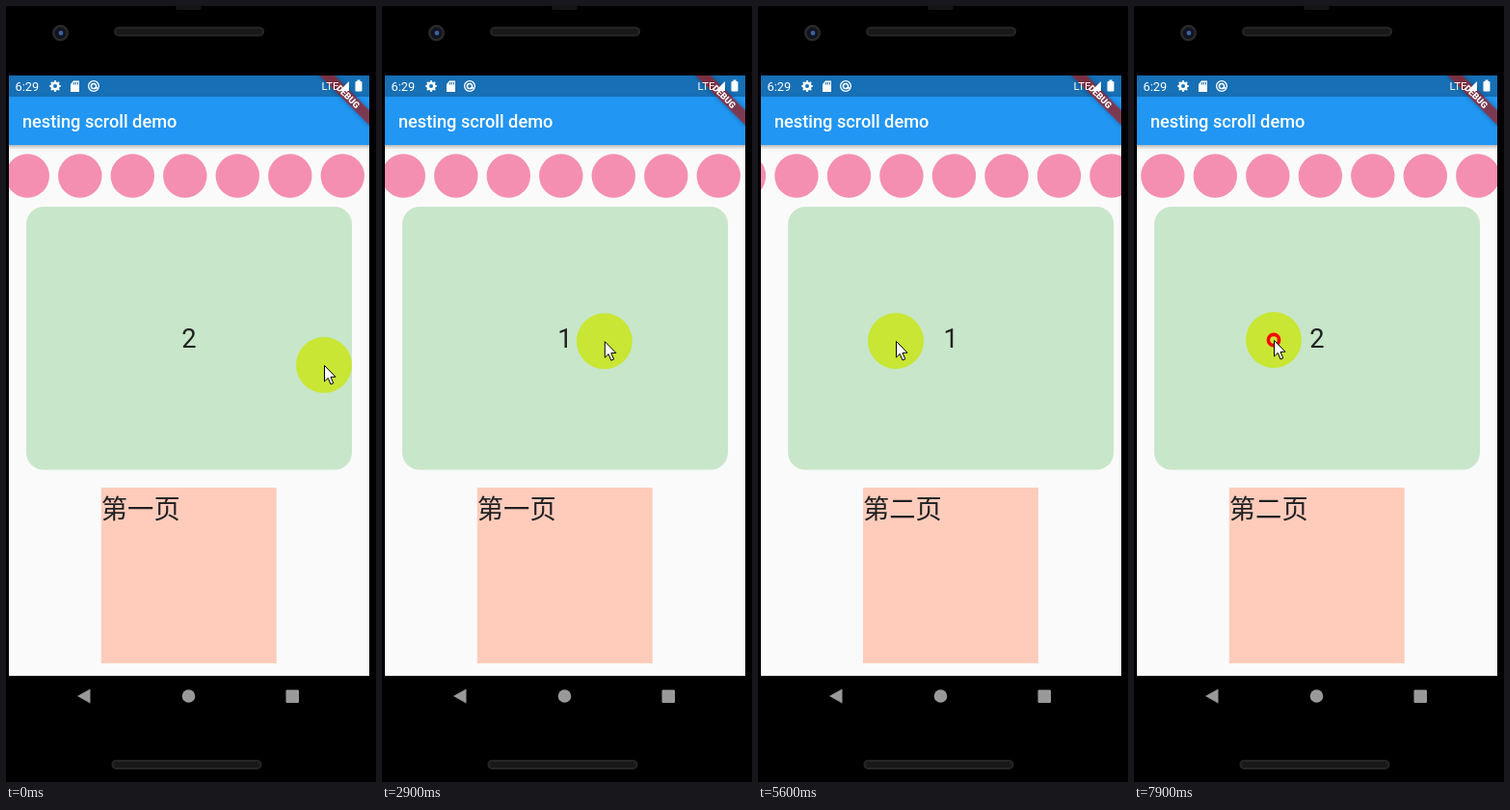
Recreate the animation shown at these times as an HTML page with a canvas. Size 384 by 804 pixels, loop 8 s.

```html
<!DOCTYPE html>
<html lang="zh-CN">
<head>
<meta charset="utf-8">
<style>
  html, body { margin: 0; height: 100%; overflow: hidden; background: #000; }
  canvas { display: block; }
</style>
</head>
<body>
<canvas id="stage" width="384" height="804"></canvas>
<script>
const ctx = document.getElementById('stage').getContext('2d');
const LOOP = 8000, STEP = 100, SETTLE = 505;
const LEFT = 3, WIDTH = 374, TOP = 144, BOTTOM = 694;
const FONT = 'Roboto, "Noto Sans CJK SC", "Noto Sans CJK", sans-serif';

// Each drag moves a pager with the cursor, then lets it settle from page `start` to page `end`.
const pointerStart = { time: -600, point: [330, 372] };
const drags = [
  { pager: 'upper', press: 1450, release: 2200, from: [205, 350], to: [356, 357], start: 1, end: 0 },
  { pager: 'upper', press: 3000, release: 3550, from: [215, 346], to: [337, 344], start: 0, end: 0 },
  { pager: 'upper', press: 3900, release: 4470, from: [337, 344], to: [165, 350], start: 0, end: 1 },
  { pager: 'outer', press: 4900, release: 5200, from: [282, 349], to: [143, 347], start: 0, end: 1 },
  { pager: 'lower', press: 6400, release: 6850, from: [230, 348], to: [110, 350], start: 0, end: 1 },
  { press: 7850, release: 8000, from: [145, 346], to: [145, 346] }
];

const clamp = u => Math.min(1, Math.max(0, u));
const smooth = u => u * u * (3 - 2 * u);
const easeOut = u => 1 - (1 - u) ** 2;
const mix = (a, b, u) => a + (b - a) * u;
const mixPoint = (a, b, u) => a.map((v, i) => mix(v, b[i], u));

// Between drags the pointer rests a while, then glides to the next press.
function pointer(t) {
  let last = pointerStart;
  for (const { press, release, from, to } of drags) {
    if (t < press) {
      const u = (t - last.time) / (press - last.time);
      return mixPoint(last.point, from, smooth(clamp((u - .4) / .6)));
    }
    if (t <= release) return mixPoint(from, to, (t - press) / (release - press));
    last = { time: release, point: to };
  }
  return last.point;
}

// A negative result is a pull beyond the first page.
function pagerPosition(pager, t) {
  const own = drags.filter(d => d.pager === pager);
  const drag = own.filter(d => t >= d.press).pop();
  if (!drag) return own[0].start;
  const { release, from, start, end } = drag;
  const held = start + (from[0] - pointer(Math.min(t, release))[0]) / WIDTH;
  return mix(held, end, easeOut(clamp((t - release) / SETTLE)));
}

function rect(x, y, w, h, color, radius = 0) {
  ctx.fillStyle = color;
  ctx.beginPath();
  ctx.roundRect(x, y, w, h, radius);
  ctx.fill();
}

function disc(x, y, r, color) {
  ctx.fillStyle = color;
  ctx.beginPath();
  ctx.arc(x, y, r, 0, Math.PI * 2);
  ctx.fill();
}

function ring(x, y, r, width, color) {
  ctx.strokeStyle = color;
  ctx.lineWidth = width;
  ctx.beginPath();
  ctx.arc(x, y, r, 0, Math.PI * 2);
  ctx.stroke();
}

function polygon(points, color) {
  ctx.fillStyle = color;
  ctx.beginPath();
  points.forEach(([x, y]) => ctx.lineTo(x, y));
  ctx.closePath();
  ctx.fill();
}

function text(str, x, y, size, color, weight = 400, align = 'left') {
  ctx.font = `${weight} ${size}px ${FONT}`;
  ctx.textAlign = align;
  ctx.fillStyle = color;
  ctx.fillText(str, x, y);
}

function clipped(x, y, w, h, draw) {
  ctx.save();
  ctx.beginPath();
  ctx.rect(x, y, w, h);
  ctx.clip();
  draw();
  ctx.restore();
}

function speaker(x, y) {
  rect(x, y, 156, 10, '#262626', 5);
  rect(x + 2, y + 2, 152, 6, '#181818', 3);
}

function drawPhone() {
  rect(0, 0, 384, 804, '#000');
  rect(176, 0, 27, 4, '#151515', 2);
  disc(56.5, 28, 8.5, '#2b2828');
  disc(56.5, 28, 6, '#111420');
  disc(57, 28, 2.4, '#3f5f9c');
  speaker(112, 21.5);
  speaker(109.5, 781);
  polygon([[74, 715], [87.5, 707.5], [87.5, 722.5]], '#999');
  disc(189.5, 715, 6.8, '#999');
  rect(290.5, 708.5, 13.5, 13.5, '#999', 1);
}

function drawPage(index, position, outerPosition) {
  const x = LEFT + WIDTH * (index - outerPosition);
  clipped(x, 208, WIDTH, 273, () => {
    for (let n = 0; n < 2; n++) {
      const cardX = x + WIDTH * (n - position);
      rect(cardX + 18, 208, 338, 272.5, '#c8e6c9', 18);
      text(n + 1, cardX + WIDTH / 2, 354, 27.3, '#212121', 400, 'center');
    }
  });
  rect(x + 95.8, 499, 182, 182, '#ffccbc');
  text(index ? '第二页' : '第一页', x + 95.8, 530.5, 27.3, '#212121');
}

// Overscroll glow: a parabolic edge bulging from the left side.
function drawGlow(top, bottom, centre, reach, bend, alpha) {
  ctx.fillStyle = `rgba(33,150,243,${alpha})`;
  ctx.beginPath();
  ctx.moveTo(LEFT, top);
  for (let y = top; y <= bottom; y += 2) {
    ctx.lineTo(LEFT + Math.max(0, reach - bend * (y - centre) ** 2), y);
  }
  ctx.lineTo(LEFT, bottom);
  ctx.fill();
}

function drawContent(t) {
  const outer = pagerPosition('outer', t), upper = pagerPosition('upper', t);
  const glow = clamp(-4 * upper);
  rect(LEFT, TOP, WIDTH, BOTTOM - TOP, '#fafafa');
  for (let n = 0; n < 15; n++) disc(22.3 + 54.5 * n - WIDTH * outer, 176, 22.7, '#f48fb1');
  drawPage(0, Math.max(0, upper), outer);
  drawPage(1, pagerPosition('lower', t), outer);
  if (glow) {
    drawGlow(208, 480, 344, 39.5 * glow, .0009 * glow, .4 * glow);
    drawGlow(TOP, BOTTOM, 375, 57 * glow, .0003 * glow, .36 * glow);
  }
  const shade = ctx.createLinearGradient(0, TOP, 0, TOP + 5);
  shade.addColorStop(0, 'rgba(0,0,0,.25)');
  shade.addColorStop(1, 'rgba(0,0,0,0)');
  rect(LEFT, TOP, WIDTH, 5, shade);
}

function drawDebugBanner() {
  clipped(LEFT, 72, WIDTH, 72, () => {
    ctx.translate(LEFT + WIDTH, 72);
    ctx.rotate(Math.PI / 4);
    ctx.shadowColor = 'rgba(0,0,0,.5)';
    ctx.shadowBlur = 5;
    rect(-37, 25.5, 74, 10.9, 'rgba(183,28,28,.63)');
    ctx.shadowColor = 'transparent';
    text('DEBUG', 0, 34.2, 9.3, '#fff', 900, 'center');
  });
}

function drawStatus() {
  text('6:29', 9.5, 87.5, 12.8, '#fff');
  ring(51, 83, 3.3, 2.6, '#fff');
  for (let a = 0; a < 8; a++) {
    disc(51 + 4.9 * Math.cos(a * Math.PI / 4), 83 + 4.9 * Math.sin(a * Math.PI / 4), 1.1, '#fff');
  }
  polygon([[67, 81], [70, 77.5], [76, 77.5], [76, 89], [67, 89]], '#fff');
  for (let x = 70; x < 76; x += 2) rect(x, 79, 1, 2.5, '#176fb5');
  ring(91, 83, 5.4, 1.3, '#fff');
  ring(91, 83, 2.6, 1.5, '#fff');
  rect(92, 84, 3, 1.6, '#fff');
  text('LTE', 327.5, 87, 11.5, '#fff');
  polygon([[346, 88], [356, 78], [356, 88]], '#fff');
  rect(362.5, 78, 7, 10.5, '#fff', 1);
  rect(364.5, 76.5, 3, 2, '#fff');
}

function drawBars() {
  rect(LEFT, 72, WIDTH, 22, '#176fb5');
  rect(LEFT, 94, WIDTH, 50, '#2196f3');
  text('nesting scroll demo', 17, 126, 18.2, '#fff', 500);
  drawDebugBanner();
  drawStatus();
}

function drawPointer(t) {
  ctx.save();
  ctx.translate(...pointer(t));
  ctx.globalCompositeOperation = 'multiply';
  disc(0, 0, 29, '#ffff40');
  ctx.globalCompositeOperation = 'source-over';
  if (drags.some(d => t >= d.press && t < d.release)) ring(0, 0, 5.6, 3.6, '#f00');
  polygon([[.5, .5], [.5, 17], [4.3, 13.4], [7, 20], [9.8, 18.8], [7, 12.4], [12, 12.2]], '#fff');
  ctx.strokeStyle = '#000';
  ctx.lineWidth = 1;
  ctx.stroke();
  ctx.restore();
}

function render() {
  const t = Math.floor(performance.now() % LOOP / STEP) * STEP;
  drawPhone();
  clipped(LEFT, TOP, WIDTH, BOTTOM - TOP, () => drawContent(t));
  drawBars();
  drawPointer(t);
  requestAnimationFrame(render);
}
render();
</script>
</body>
</html>
```
